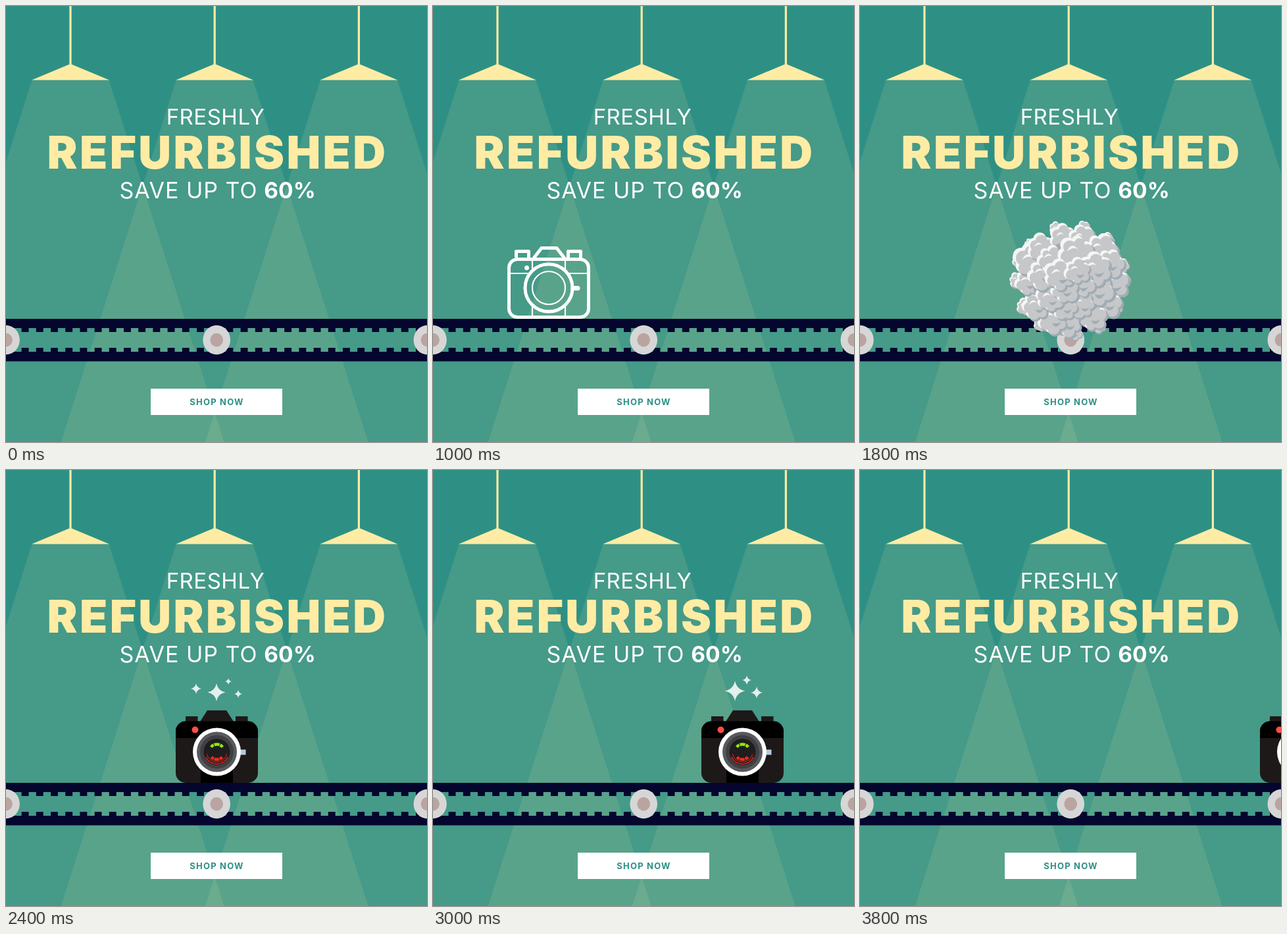
An HTML page for the animation above (4000 ms loop, 640x662 px).

```html
<!DOCTYPE html>
<html lang="en">
<head>
<meta charset="utf-8">
<title>Freshly refurbished</title>
<style>
  html, body { margin: 0; width: 100%; height: 100%; overflow: hidden; background: #2e9085; }
  svg { display: block; width: 640px; height: 662px; }
  text { font-family: Inter, "Open Sans", sans-serif; text-anchor: middle; fill: #fff; }
</style>
</head>
<body>
<svg viewBox="0 0 640 662">
  <rect width="640" height="662" fill="#2e9085"/>
  <g id="lamps" fill="#ffeca4"></g>

  <text x="318.5" y="180" font-size="33" font-weight="400" letter-spacing=".5">FRESHLY</text>
  <text x="321.5" y="247" font-size="69" font-weight="900" letter-spacing="3.4" style="fill:#ffeca4">REFURBISHED</text>
  <text x="277.5" y="291.5" font-size="34" font-weight="400" letter-spacing="1">SAVE UP TO</text>
  <text x="431.5" y="291.5" font-size="33.500" font-weight="700">60%</text>

  <path id="belt" fill="#04062e"/>
  <g id="rollers"></g>

  <rect x="220" y="581" width="200" height="40" fill="#fff"/>
  <text x="320.6" y="606" font-size="13" font-weight="700" letter-spacing="1.2" style="fill:#2e9085">SHOP NOW</text>

  <g id="oldCamera" fill="none" stroke="#fff" stroke-width="5" stroke-linejoin="round">
    <rect x="2.5" y="384.5" width="121" height="88" rx="13"/>
    <path d="M13.5 382v-9.5h19v9.5M92.5 382v-9.5h19v9.5M40 383L52 367.5H75L87 383"/>
    <circle cx="63" cy="428" r="36"/>
    <g stroke-width="2.2">
      <circle cx="63" cy="428" r="25"/>
      <path d="M5 406H34.5M91.5 406H121M38 387V402M88 387V402M38 454V470M88 454V470"/>
    </g>
    <circle cx="29.5" cy="397.5" r="3.5" fill="#fff" stroke="none"/>
    <path d="M100 428.5h7" stroke-width="7" stroke-linecap="round"/>
  </g>

  <g id="newCamera">
    <g fill="#1d1918">
      <path d="M15 382v-8h18.5v8M91 382v-8h18.5v8M37 382L48 365H77L88 382"/>
      <rect y="381.5" width="125" height="93.5" rx="15"/>
    </g>
    <path d="M0 407v-10.500a15 15 0 0 1 15 -15h95a15 15 0 0 1 15 15v10.500H87v68H38v-68Z"/>
    <circle cx="29.5" cy="394.5" r="5" fill="#fb4f45"/>
    <rect x="96" y="424.5" width="10.5" height="8" fill="#b4c9dc"/>
    <g id="lens" transform="translate(62.5 428)" fill="none"></g>
  </g>

  <path id="stars" fill="#fff" opacity=".85"/>
  <g transform="translate(320 416)"><g id="wisps"></g><g id="ring"></g><g id="core"></g></g>
</svg>
<script>
const $ = id => document.getElementById(id);
const STEP = 200, LOOP = 4000, TURN = Math.PI * 2;
const polar = (r, a) => [r * Math.cos(a), r * Math.sin(a)];
const times = (n, make) => Array.from({ length: n }, (_, i) => make(i)).join('');

// Lamps: every beam widens by the same slope down to the floor.
$('lamps').innerHTML = times(3, i => `<g transform="translate(${98 + 219.2 * i})">
  <path d="M-58.5 112.5H58.5L233.5 662H-233.5Z" opacity=".11"/>
  <path d="M-1.6 0H1.6V88.500L59 112.5H-59L-1.6 88.500Z"/></g>`);

// Conveyor belt with teeth facing inwards.
$('belt').setAttribute('d', 'M0 475H640v14H0ZM0 525H640v14.5H0Z' + times(29, i => {
  const x = 1.4 + 22.2 * i;
  return `M${x} 488h10.9v7h-10.9ZM${x} 519h10.9v7h-10.9Z`;
}));
$('rollers').innerHTML = times(3, i => `<g transform="translate(${320.2 * i} 507)">
  <ellipse rx="20.8" ry="22.3" fill="#d6d6d6"/><ellipse rx="9.8" ry="10.3" fill="#baa4a1"/></g>`);

// Lens: nested discs, then reflections spread around a given angle.
const disc = (r, color) => `<circle r="${r}" fill="${color}"/>`;
const glint = (r, middle, spread, color, width, dash = '') =>
  `<path d="M${polar(r, middle - spread)}A${r} ${r} 0 0 1 ${polar(r, middle + spread)}"
    stroke="${color}" stroke-width="${width}" stroke-dasharray="${dash}"/>`;
$('lens').innerHTML =
  disc(36.5, '#fff') + disc(30.5, '#59595d') + disc(25.5, '#404044') + disc(20, '#201d1e') +
  glint(11.5, -TURN / 4, .87, '#8fe70c', 4.5, '5 1 8 1') +
  glint(11.5, TURN / 4, .8, '#fb2b1c', 4.5, '5 1 7 1') +
  glint(15.5, TURN / 4, 1.36, '#c3201a', 1.2) +
  glint(18.5, TURN / 4, 1.13, '#e0251b', 1.5);

// Smoke: rings of puffs, each a ball of lobes with a light and a dark side.
let seed = 11;
const random = () => (seed = seed * 16807 % 2147483647) / 2147483647;

function puff(x, y, r) {
  const lobes = [[0, 0, .7 * r]], turn = random() * TURN;
  for (let i = 0; i < 6; i++) {
    lobes.push([...polar(r * .6, turn + i * TURN / 6), r * (.32 + random() * .18)]);
  }
  const layer = (shift, grow, color) => `<g fill="${color}">` + lobes.map(([u, v, s]) =>
    `<circle cx="${u + shift * r}" cy="${v + shift * r}" r="${s * grow}"/>`).join('') + '</g>';
  const curl = (dx, dy, bend, color) =>
    `<path d="M${dx * r} ${dy * r}q${.3 * r} ${bend * r} ${.65 * r} ${-.1 * r}q${-.2 * r} ${bend * .4 * r} ${-.65 * r} ${.1 * r}" fill="${color}"/>`;
  return `<g transform="translate(${x} ${y})">` +
    layer(.13, 1, '#a0acb4') + layer(-.1, 1, '#f5f6f7') + layer(.03, .9, '#c6c7c9') +
    curl(-.1, .25, .55, '#a0acb4') + curl(-.6, -.1, -.6, '#f5f6f7') + '</g>';
}
const puffRing = (count, radius, size) => times(count, i => {
  const a = (i + random() * .5) * TURN / count;
  return puff(...polar(radius, a), size * (.85 + random() * .3));
});
$('wisps').innerHTML = puffRing(13, 81, 10.5);
$('ring').innerHTML = puffRing(13, 65, 22);
$('core').innerHTML = disc(58, '#a0acb4') + puffRing(8, 42, 23) + puffRing(4, 17, 21);

// Sparkles, relative to the camera: x, y, radius, growth.
const sparkles = [[31, 332, 8, -8], [62, 337.5, 13.5, 2], [80, 321, 5, 2], [95, 340, 6, 3]];

function star(x, y, r) {
  const k = r * .16;
  return `M${x} ${y - r}Q${x + k} ${y - k} ${x + r} ${y}Q${x + k} ${y + k} ${x} ${y + r}` +
    `Q${x - k} ${y + k} ${x - r} ${y}Q${x - k} ${y - k} ${x} ${y - r}Z`;
}

const show = (id, on) => $(id).style.display = on ? '' : 'none';
const move = (id, x) => $(id).setAttribute('transform', `translate(${x} 0)`);

function draw(time) {
  const step = Math.floor(time % LOOP / STEP);
  show('oldCamera', step < 9);
  move('oldCamera', Math.min(257, 50 * step - 137));

  const x = 258 + 50 * Math.max(0, step - 12);
  show('newCamera', step >= 10);
  move('newCamera', x);

  // The smoke clears from the middle outwards.
  show('core', step === 9);
  show('ring', step === 9 || step === 10);
  show('wisps', step >= 9 && step < 12);
  $('ring').setAttribute('transform', `scale(${step === 9 ? 1 : .86})`);

  show('stars', step >= 12);
  const w = 1.1 * Math.sin((step - 12) * Math.PI / 5) ** 2;
  move('stars', x - 11 * w);
  $('stars').setAttribute('d', sparkles.map(([u, v, r, growth]) =>
    star(u, v - 2 * w, Math.max(0, r + growth * w))).join(''));
}

const start = performance.now();
function tick() {
  draw(performance.now() - start);
  requestAnimationFrame(tick);
}
tick();
</script>
</body>
</html>
```
